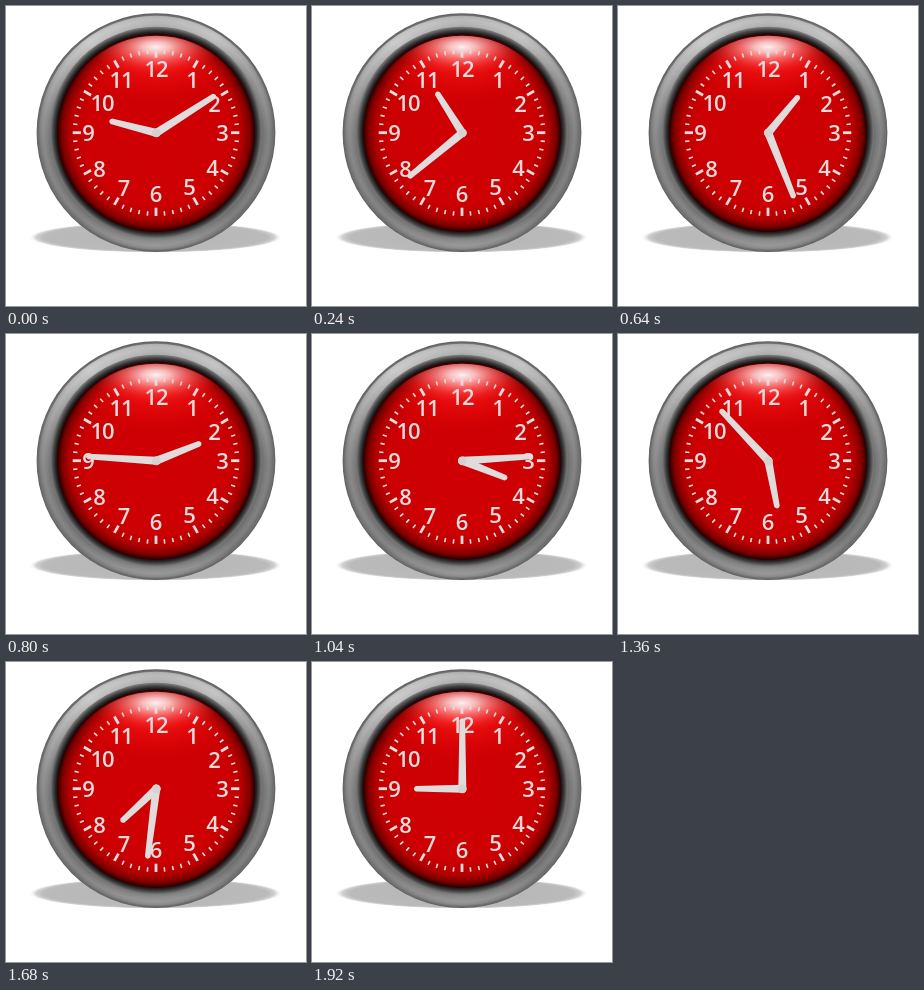
An HTML page with a canvas that plays this animation: 300 px wide and 300 px high, repeating every 2 s.

```html
<!DOCTYPE html>
<html lang="en">
<head>
<meta charset="utf-8">
<title>Red clock</title>
<style>
html, body { margin: 0; width: 100%; height: 100%; overflow: hidden; background: #fff; }
canvas { display: block; width: 300px; height: 300px; }
</style>
</head>
<body>
<canvas id="stage" width="300" height="300"></canvas>
<script>
const ctx = document.getElementById('stage').getContext('2d');
const TAU = Math.PI * 2, RAD = Math.PI / 180;
const CX = 150, CY = 126.7;
const STEP = 80, STEPS = 25;

function addStops(gradient, stops) {
  stops.forEach(([at, color]) => gradient.addColorStop(at, color));
  return gradient;
}

function radial(x, y, r0, r1, stops) {
  return addStops(ctx.createRadialGradient(x, y, r0, x, y, r1), stops);
}

function disc(x, y, r, fill) {
  ctx.fillStyle = fill;
  ctx.beginPath();
  ctx.arc(x, y, r, 0, TAU);
  ctx.fill();
}

// Soft elliptical glow: a squashed radial gradient
function glow(x, y, rx, ry, stops) {
  ctx.save();
  ctx.translate(x, y);
  ctx.scale(1, ry / rx);
  disc(0, 0, rx, radial(0, 0, 0, rx, stops));
  ctx.restore();
}

function drawBezel() {
  disc(CX, CY, 119.4, radial(CX, CY, 98, 119.4, [
    [0, '#160808'], [.12, '#262424'], [.24, '#4c4c4c'], [.34, '#757575'],
    [.5, '#868686'], [.68, '#929292'], [.82, '#868686'], [.93, '#6c6c6c'], [1, '#5c5c5c']
  ]));
  // Light from above, slightly darker flanks
  const light = addStops(ctx.createConicGradient(-Math.PI / 2, CX, CY), [
    [0, '#ffffff60'], [.09, '#ffffff78'], [.17, '#ffffff18'], [.25, '#00000018'],
    [.38, '#00000020'], [.5, '#ffffff10'], [.62, '#00000018'], [.72, '#00000010'],
    [.8, '#ffffff20'], [.9, '#ffffff88'], [1, '#ffffff60']
  ]);
  ctx.strokeStyle = light;
  ctx.lineWidth = 11;
  ctx.beginPath();
  ctx.arc(CX, CY, 111.5, 0, TAU);
  ctx.stroke();
}

function drawFace() {
  disc(CX, CY, 99, radial(CX, CY, 0, 99, [
    [0, '#d00004'], [.74, '#cc0003'], [.87, '#b40002'], [.95, '#7c0000'], [1, '#260000']
  ]));
  ctx.save();
  ctx.beginPath();
  ctx.arc(CX, CY, 97, 0, TAU);
  ctx.clip();
  glow(CX, 54, 92, 46, [[0, '#ff2020c0'], [.5, '#f4101070'], [1, '#e0000000']]);
  glow(CX, 41, 68, 28, [[0, '#fffffff0'], [.2, '#ffe0e0d0'], [.45, '#ff909098'], [.75, '#ff505038'], [1, '#ff202000']]);
  ctx.restore();
}

function drawDial() {
  ctx.strokeStyle = ctx.fillStyle = '#eadada';
  for (let i = 0; i < 60; i++) {
    const major = i % 5 === 0, a = i * 6 * RAD;
    const s = Math.sin(a), c = Math.cos(a), inner = major ? 75 : 79;
    ctx.lineWidth = major ? 2.8 : 1.6;
    ctx.beginPath();
    ctx.moveTo(CX + s * inner, CY - c * inner);
    ctx.lineTo(CX + s * 83.3, CY - c * 83.3);
    ctx.stroke();
  }
  ctx.font = '600 22px "Open Sans", "Noto Sans", sans-serif';
  ctx.letterSpacing = '-1px';
  ctx.textAlign = 'center';
  const spots = [[186, 74], [208, 98], [216, 127.5], [206, 162], [183, 181.5], [149.5, 188.5],
    [117.5, 182], [93, 163], [82, 127.5], [96, 97.5], [115, 74], [150, 63.5]];
  spots.forEach(([x, y], i) => ctx.fillText(i + 1, x, y + 7.8));
}

function drawHand(angle, length) {
  ctx.save();
  ctx.translate(150.3, 126.8);
  ctx.rotate(angle * RAD);
  ctx.fillStyle = '#e0dcdc';
  ctx.beginPath();
  ctx.moveTo(-4, 0);
  ctx.lineTo(-2.8, 2.5 - length);
  ctx.quadraticCurveTo(0, -length - 1.5, 2.8, 2.5 - length);
  ctx.lineTo(4, 0);
  ctx.arc(0, 0, 4, 0, Math.PI);
  ctx.fill();
  ctx.restore();
}

function draw(now) {
  const step = Math.floor(now / STEP) % STEPS + 1;
  const turn = step / STEPS * 360;
  ctx.fillStyle = '#fff';
  ctx.fillRect(0, 0, 300, 300);
  glow(149.5, 231.3, 127, 15.5, [[0, '#b6b6b6'], [.88, '#bababa'], [.94, '#d0d0d0'], [1, '#ffffff00']]);
  drawBezel();
  drawFace();
  drawDial();
  // Sets off from nine o'clock; the minute hand turns four times per loop
  drawHand(270 + turn, 49);
  drawHand(turn * 4, 71);
  disc(150.3, 126.8, 4.4, '#d6d2d2');
}

let start;
function tick(now) {
  start ??= now;
  draw(now - start);
  requestAnimationFrame(tick);
}
draw(0);
requestAnimationFrame(tick);
</script>
</body>
</html>
```
